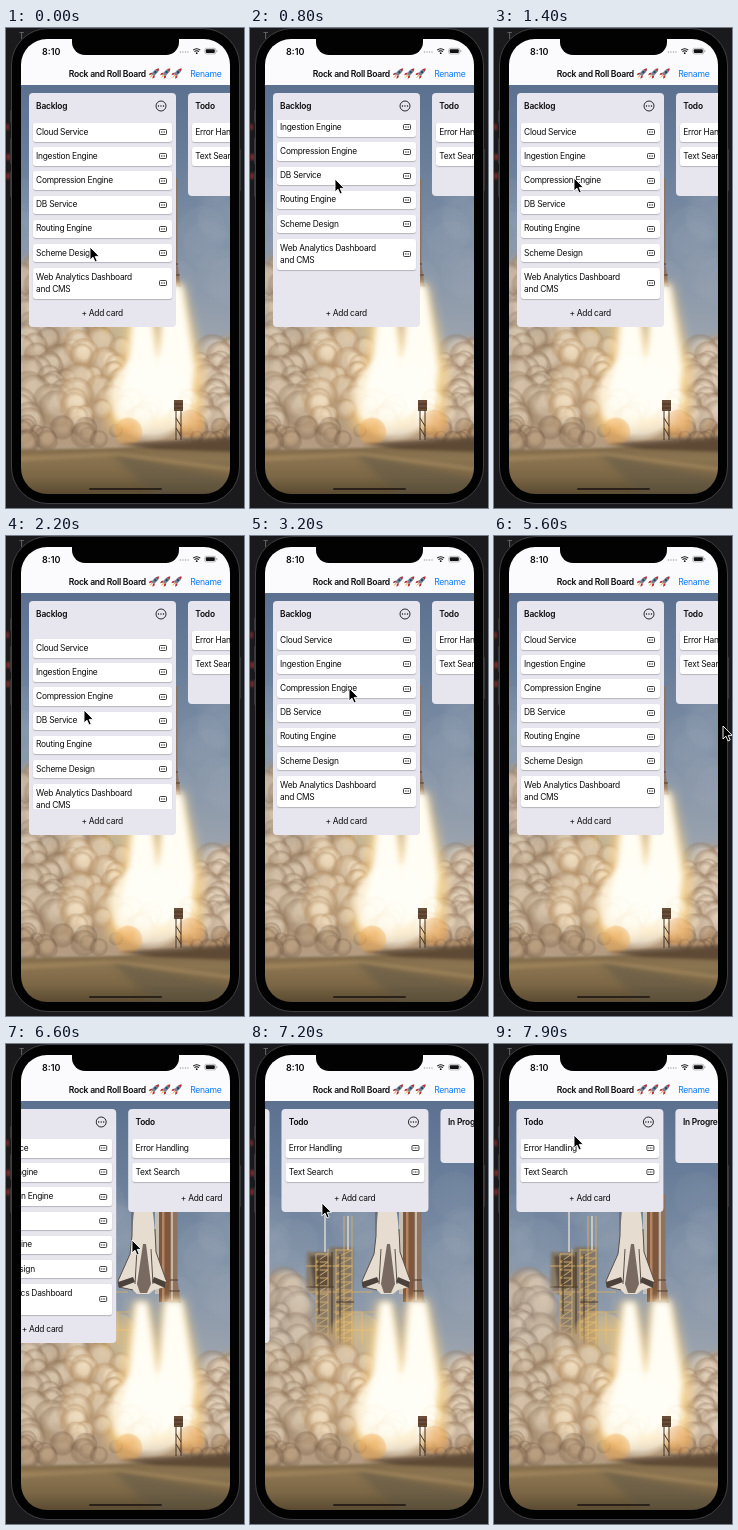
Animation of 238x480 px, one loop 8000 ms. Source, as an HTML page with a canvas:

```html
<!DOCTYPE html>
<html lang="en">
<head>
<meta charset="utf-8">
<title>Board</title>
<style>
html, body { margin: 0; width: 100%; height: 100%; overflow: hidden; background: #1a1a1c; }
body { position: relative; font: 400 8.4px/12.6px Inter, "Liberation Sans", sans-serif; letter-spacing: -.27px; color: #0b0b0d; }
div, svg, canvas { position: absolute; display: block; }
.text { white-space: nowrap; line-height: 12px; }
.bold { font-weight: 600; letter-spacing: -.2px; }
#stage { left: 0; top: 0; width: 238px; height: 480px; overflow: hidden; }
#phone { left: 5px; top: 0; width: 227px; height: 474px; border: 1px solid #3f3f42; border-radius: 37px; background: #020202; }
.button { width: 2px; background: #37373a; border-radius: 1px; }
.smear { left: 0; background: #74292b; filter: blur(.8px); }
#screen { left: 14.6px; top: 11px; width: 209.8px; height: 455.4px; border-radius: 26px; overflow: hidden; }
#view { left: -14.6px; top: -11px; width: 238px; height: 480px; }
#photo { left: 14px; top: 57px; }
#header { left: 14px; top: 10px; width: 211px; height: 47px; background: #fbfbfd; }
#notch { left: 66px; top: 0; width: 107px; height: 27px; background: #020202; border-radius: 0 0 13px 13px; }
#home { left: 83px; top: 459.5px; width: 73px; height: 2.4px; border-radius: 2px; background: #2a2219; }
.column { top: 65px; width: 147px; border-radius: 4px; background: #e7e6ee; }
.list { left: 0; top: 27px; width: 147px; overflow: hidden; }
.card { left: 4px; width: 139px; border-radius: 2.5px; background: #fff; box-shadow: 0 .8px 1px rgba(0,0,0,.28); }
.card > div, #ghost > div { white-space: pre; }
.add { width: 147px; text-align: center; }
#ghost { left: 0; top: 0; width: 147px; height: 24px; background: rgba(249,249,251,.88); transform-origin: 0 0; box-shadow: 0 0 2px rgba(0,0,0,.12); }
</style>
</head>
<body>
<div id="stage">
  <div class="text" style="left:13px;top:2px;color:#77777a">T</div>
  <div class="smear" style="top:96px;width:3px;height:6px"></div>
  <div class="smear" style="top:126px;width:5px;height:6px"></div>
  <div class="smear" style="top:145px;width:4px;height:6px"></div>
  <div class="button" style="left:4px;top:82px;height:13px"></div>
  <div class="button" style="left:4px;top:110px;height:26px"></div>
  <div class="button" style="left:4px;top:143px;height:26px"></div>
  <div class="button" style="left:233px;top:121px;height:42px"></div>
  <div id="phone"></div>
  <div id="screen"><div id="view">
    <canvas id="photo" width="211" height="410"></canvas>
    <div id="board"></div>
    <div id="ghost"></div>
    <div id="header"></div>
    <div id="notch"></div>
    <div class="text bold" style="left:36px;top:17.5px;font-size:9px;letter-spacing:0">8:10</div>
    <div class="text bold" style="left:62.7px;top:39.5px;font-size:8.6px;letter-spacing:-.27px">Rock and Roll Board</div>
    <div class="text" style="left:184.2px;top:39.5px;font-size:8.6px;color:#087aff">Rename</div>
    <svg width="238" height="60">
      <defs><g id="rocket">
        <path d="M3 6.2L.8 9.2 3.8 7Z" fill="#ee9a25"/>
        <path d="M3.6 4L1.3 4.6 .5 6.4 3 5.8ZM6 6.4L5.4 8.7 3.6 9.5 4.2 7Z" fill="#b32b30"/>
        <path d="M9.5.5C6.5.6 4 3 3 5.5L4.5 7C7 6 9.4 3.5 9.5.5Z" fill="#77828f"/>
        <path d="M9.5.5C8.5.5 7.6.8 6.8 1.2L8.8 3.2C9.2 2.4 9.5 1.5 9.5.5Z" fill="#c42a32"/>
        <circle cx="6.3" cy="3.7" r="1" fill="#1d466f"/>
      </g></defs>
      <g transform="translate(142.3 40) scale(1.12)">
        <use href="#rocket"/><use href="#rocket" x="10.1"/><use href="#rocket" x="20.2"/>
      </g>
      <path d="M174.5 24h.01M177 24h.01M179.5 24h.01M182 24h.01" stroke="#aaaaae" stroke-width="1.5" stroke-linecap="round"/>
      <path d="M187.2 22.2a5 5 0 0 1 7 0M188.5 23.7a3.1 3.1 0 0 1 4.4 0" fill="none" stroke="#111" stroke-width="1.1"/>
      <circle cx="190.7" cy="25.2" r=".9" fill="#111"/>
      <rect x="198.8" y="20.3" width="11" height="5.6" rx="1.7" fill="none" stroke="#8c8c90" stroke-width=".6"/>
      <rect x="199.8" y="21.3" width="9" height="3.6" rx=".9" fill="#111"/>
      <path d="M210.8 22.2v1.8" stroke="#8c8c90" stroke-width=".8"/>
    </svg>
    <div id="home"></div>
  </div></div>
  <svg id="cursor" width="12" height="18" style="overflow:visible">
    <path d="M0 0V13L3 10.2 5 15 7.2 14 5.2 9.4H9.3Z" fill="#000" stroke="#fff" stroke-width=".9" stroke-linejoin="round"/>
  </svg>
</div>
<script>
const LOOP = 8000, FRAME = 100, PITCH = 24.1, LEFT = 22.6, COLUMN_PITCH = 159.2;
const $ = id => document.getElementById(id);

function add(parent, cls, style, text = '') {
  const el = document.createElement('div');
  el.className = cls;
  Object.assign(el.style, style);
  el.textContent = text;
  parent.append(el);
  return el;
}

function icon(parent, x, y, shape) {
  parent.insertAdjacentHTML('beforeend',
    `<svg width="12" height="12" viewBox="-6 -6 12 12" style="left:${x - 6}px;top:${y - 6}px">` +
    `<g fill="none" stroke="#151517">${shape}</g></svg>`);
}
const cardIcon = '<rect x="-3.5" y="-2.5" width="7" height="5" rx="1" stroke-width=".8"/>' +
  '<path d="M-2 0h.9M-.45 0h.9M1.1 0h.9" stroke-width="1"/>';
const menuIcon = '<circle r="5" stroke-width=".9"/>' +
  '<path d="M-2.5 0h.01M0 0h.01M2.5 0h.01" stroke-width="1.4" stroke-linecap="round"/>';

function makeColumn(index, title, names, height) {
  const column = add($('board'), 'column', { left: LEFT + index * COLUMN_PITCH + 'px', height: height + 'px' });
  add(column, 'text bold', { left: '7.5px', top: '7px' }, title);
  icon(column, 132.5, 13, menuIcon);
  const view = add(column, 'list', { height: height - 53 + 'px' });
  const list = add(view, '', { width: '147px' });
  const cards = names.map((name, i) => {
    const tall = 12.6 * name.split('\n').length + 5.8;
    const card = add(list, 'card', { top: 3.2 + i * PITCH + 'px', height: tall + 'px' });
    add(card, '', { left: '3.5px', top: '2.9px' }, name);
    icon(card, 130.2, tall / 2, cardIcon);
    return card;
  });
  add(column, 'text add', { top: height - 19.5 + 'px' }, '+ Add card');
  return { list, cards };
}

const backlog = makeColumn(0, 'Backlog', ['Cloud Service', 'Ingestion Engine', 'Compression Engine',
  'DB Service', 'Routing Engine', 'Scheme Design', 'Web Analytics Dashboard\nand CMS'], 233.5);
makeColumn(1, 'Todo', ['Error Handling', 'Text Search'], 102.5);
makeColumn(2, 'In Progress', [], 54);
add($('ghost'), '', { left: '7.5px', top: '5.7px' }, 'Compression Engine');
icon($('ghost'), 134.2, 12, cardIcon);

function paintPhoto() {
  const c = $('photo').getContext('2d');
  c.translate(-14, -57);
  let seed = 11;
  const rand = () => (seed = seed * 16807 % 2147483647) / 2147483647;

  function vertical(y0, y1, ...colors) {
    const g = c.createLinearGradient(0, y0, 0, y1);
    colors.forEach((color, i) => g.addColorStop(i / (colors.length - 1), color));
    return g;
  }
  // A round billow lit from the upper right
  function puff(x, y, r, light, shade, alpha) {
    const g = c.createRadialGradient(x + r * .25, y - r * .35, 0, x, y, r);
    g.addColorStop(0, `rgba(${light},${alpha})`);
    g.addColorStop(.45, `rgba(${light},${alpha * .8})`);
    g.addColorStop(.85, `rgba(${shade},${alpha * .6})`);
    g.addColorStop(1, `rgba(${shade},0)`);
    c.fillStyle = g;
    c.fillRect(x - r, y - r, 2 * r, 2 * r);
  }
  function billow(n, x, y, w, h, r, alpha, light, shade) {
    for (let i = 0; i < n; i++) {
      puff(x + rand() * w, y + (i + rand()) / n * h, r * (.5 + rand() * .6), light, shade, alpha);
    }
  }
  const glow = (x, y, r, rgb, alpha) => puff(x, y, r, rgb, rgb, alpha);
  function shape(d, fill, blur = 0) {
    c.filter = blur ? `blur(${blur}px)` : 'none';
    c.fillStyle = fill;
    c.fill(new Path2D(d));
    c.filter = 'none';
  }
  function lines(d, color, width) {
    c.strokeStyle = color;
    c.lineWidth = width;
    c.stroke(new Path2D(d));
  }

  c.fillStyle = vertical(57, 340, '#5c7190', '#687d99', '#7a8ca3', '#8f9bab', '#a3a9b0');
  c.fillRect(14, 57, 211, 410);
  for (let i = 0; i < 26; i++) glow(14 + rand() * 211, 150 + rand() * 130, 26, '176,184,194', .12);

  // Launch tower
  shape('M57 208H80V203H103V312H66V252L56 244Z', 'rgba(132,103,64,.6)', 1);
  shape('M60 212H82V244H64Z', 'rgba(72,56,42,.65)', 1);
  let lattice = 'M86 205V312M94 172V312M102 172V312M66 210V300M78 205V300M56 222H103M58 248H122M84 268H124M100 286H124M112 268V300';
  for (let y = 206; y < 305; y += 8) lattice += `M86 ${y}H102L86 ${y + 8}M66 ${y + 4}H78L66 ${y + 12}`;
  lines(lattice, '#d0ab69', 1);
  lines('M75 168V208M98 172V206', '#e2dccf', 1.4);
  lines('M69 215V270M82 208V290M90 210V300M56 243H84M86 258H104', '#4d3a28', 1.1);
  glow(105, 296, 30, '247,203,120', .6);

  // Smoke
  shape('M14 234Q34 222 50 236Q58 262 66 284Q92 294 110 316L190 350 206 318 225 306V425H14Z', '#b59c80', 4);
  billow(16, 12, 242, 36, 66, 19, .7, '214,199,179', '150,132,116');
  billow(32, 12, 300, 62, 100, 20, .65, '218,200,175', '146,119,91');
  billow(24, 68, 312, 54, 82, 18, .65, '243,224,194', '184,147,104');
  billow(26, 188, 322, 42, 76, 19, .65, '226,209,187', '152,123,96');
  billow(14, 14, 396, 100, 20, 13, .5, '186,158,126', '110,86,64');
  billow(10, 165, 398, 62, 16, 12, .5, '188,150,108', '104,78,56');

  // Shuttle with its boosters
  shape('M149 140H156V250H149Z', '#c9bfb1');
  shape('M153 146H164V258H153Z', '#7d573e');
  shape('M156 146H158.5V258H156Z', '#b58460');
  shape('M164 150H171.5V236L174.5 258H162.5L164 236Z', '#8d7361');
  shape('M165 150H167V256H165Z', '#cbb59f');
  lines('M164 236H172M163 247H174M163 258H175', '#4a382d', 1.2);
  shape('M126 192Q128 150 137 146Q147 150 149 192L150 208 160 236 159 243 148 246 143 250H131L127 246 113 243 112 237 124 210Z', '#e6ddd0');
  lines('M126 168V192L124 210 112 237 113 243 127 246M149 185L150 208 160 236M131 205L129 240M145 205L147 240', '#5b5049', 1);
  shape('M137 200H140L145 240 141 249H134L131 240Z', '#786a60');
  shape('M112 238L127 233 129 238 113 244ZM160 238L148 233 146 238 159 244Z', '#4c423c');

  // Fire
  shape('M127 258H142L160 340 165 400H100L116 340Z', 'rgba(255,211,128,.85)', 6);
  shape('M157 256H177L196 340 194 398H136L150 330Z', 'rgba(255,214,134,.85)', 6);
  shape('M130 258H141L151 325 158 388H110L123 325Z', '#fffdf4', 3);
  shape('M159 257H176L189 340 184 386H138L154 315Z', '#fffdf4', 3);
  billow(16, 104, 372, 82, 22, 15, .5, '255,248,228', '238,204,150');
  glow(144, 370, 44, '255,254,246', 1);
  glow(122, 404, 15, '240,168,76', .65);
  glow(184, 396, 15, '226,150,70', .55);

  // Ground
  shape('M10 422L110 420 230 412V470H10Z', vertical(412, 467, '#7c6547', '#8b7450', '#7c6746', '#58492f'), .8);
  shape('M112 416L230 408V424L150 421Z', 'rgba(82,63,46,.75)', 1.5);
  shape('M104 424L230 452V470H150Z', 'rgba(92,84,70,.45)', 3);
  shape('M10 428L112 424 230 440V444L112 428 10 434Z', 'rgba(172,144,100,.5)', 1.5);
  shape('M168 372H177V383H168Z', '#6a4d36');
  lines('M170 382V412M175 382V412M170 390L175 398M170 400L175 408M168 376H177M168 380H177', '#453325', 1);
}
paintPhoto();

// Rows: time, then values. Monotone curves keep holds flat.
const cursorPath = [[0,84,219],[800,85,151],[1000,85,147],[1400,80,150],[1700,78,155],[2200,78,174],[2400,78,182],
  [2550,78,182],[3100,99,152],[3900,99,152],[4600,100,124],[4750,100,124],[5100,101,150],[5200,103,152],
  [5400,223,184],[5600,229,190],[5800,229,198],[6200,186,199],[6600,126,196],[6800,84,195],[7000,70,185],
  [7700,80,91],[8000,80,91]];
const scrollPath = [[0,0],[800,-29],[1000,-31],[1400,0],[1700,0],[2200,8],[2400,12],[2550,12],[2850,0]];
const liftPath = [[3700,0],[4000,1],[5100,1],[5300,0]];
const swapPath = [[4200,0],[4450,1],[4850,1],[5050,0]];
const boardPath = [[6150,0],[6600,-59.8],[6800,-102],[7400,-159.6]];

function value(rows, t, k = 1) {
  const last = rows.length - 1;
  if (t <= rows[0][0]) return rows[0][k];
  if (t >= rows[last][0]) return rows[last][k];
  const i = rows.findIndex(row => row[0] > t) - 1;
  const slope = j => j < 0 || j >= last ? 0 : (rows[j + 1][k] - rows[j][k]) / (rows[j + 1][0] - rows[j][0]);
  const tangent = j => {
    const a = slope(j - 1), b = slope(j);
    return a * b > 0 ? 2 * a * b / (a + b) : 0;
  };
  const span = rows[i + 1][0] - rows[i][0], u = (t - rows[i][0]) / span, v = 1 - u;
  return rows[i][k] * v * v * (1 + 2 * u) + rows[i + 1][k] * u * u * (3 - 2 * u) +
    span * u * v * (tangent(i) * v - tangent(i + 1) * u);
}

const shift = (el, x, y, scale = 1) => {
  el.style.transform = `translate(${x}px,${y}px) scale(${scale})`;
};
const mix = (a, b, u) => a + (b - a) * u;

function draw(t) {
  const x = value(cursorPath, t, 1), y = value(cursorPath, t, 2), lift = value(liftPath, t);
  shift($('cursor'), x, y);
  shift($('board'), value(boardPath, t), 0);
  shift(backlog.list, 0, value(scrollPath, t));
  shift(backlog.cards[1], 0, PITCH * value(swapPath, t));
  backlog.cards[2].style.visibility = lift > 0 ? 'hidden' : 'visible';
  $('ghost').style.visibility = lift > 0 ? 'visible' : 'hidden';
  shift($('ghost'), mix(LEFT, x - 82.5, lift), mix(140.7, y - 18, lift), 1 + .04 * lift);
}

const start = performance.now();
function tick() {
  const t = (performance.now() - start) % LOOP;
  draw(Math.floor(t / FRAME) * FRAME);
  requestAnimationFrame(tick);
}
tick();
</script>
</body>
</html>
```
